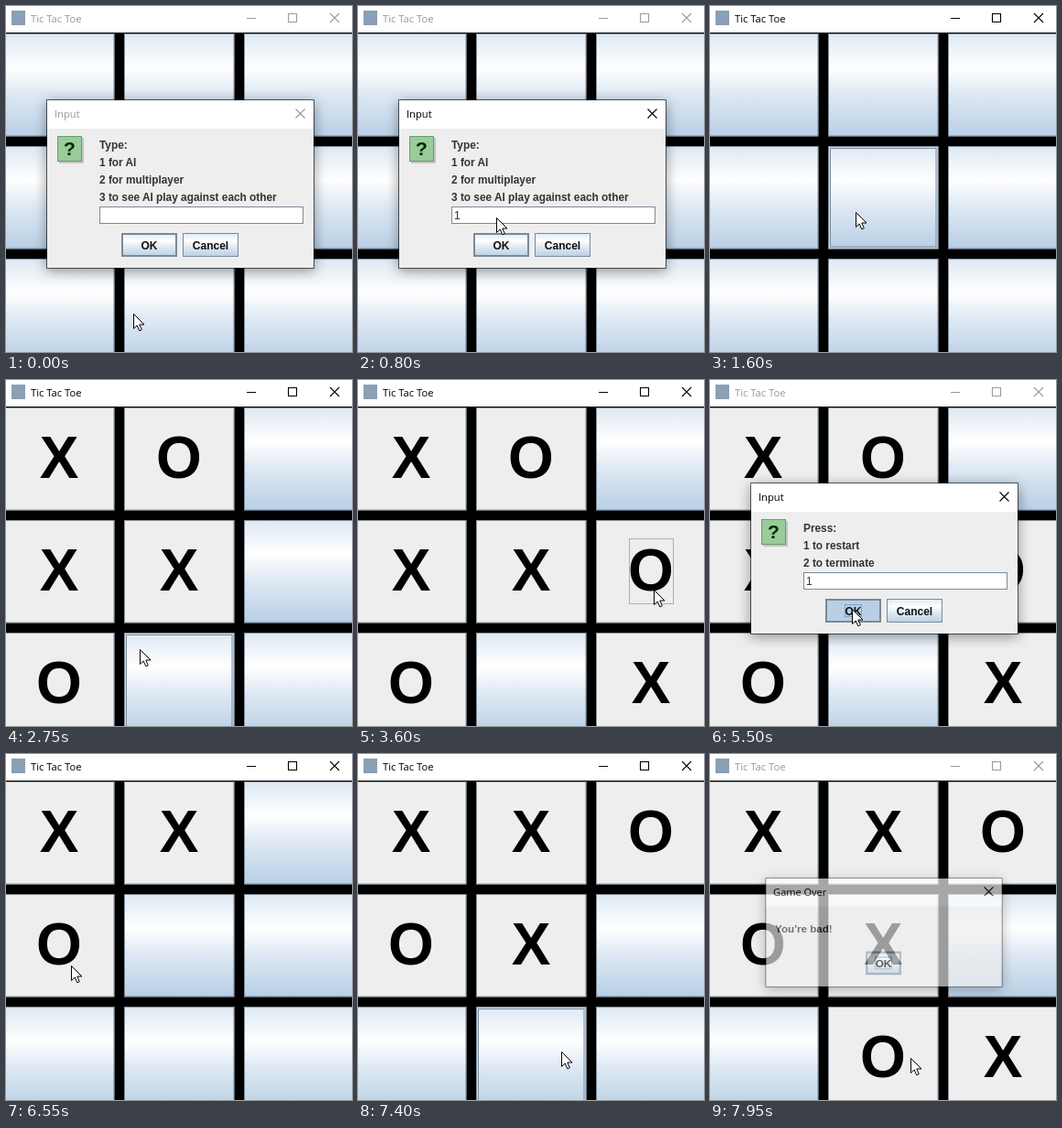
An HTML page that plays this animation: 378x378 px, repeating every 8000 ms.

```html
<!DOCTYPE html>
<html lang="en">
<head>
<meta charset="utf-8">
<title>Tic Tac Toe</title>
<style>
  html, body { margin: 0; width: 100%; height: 100%; overflow: hidden; background: #000; }
  svg { display: block; width: 100vw; height: 100vh; }
  text { white-space: pre; }
  .caption { font: 11.2px "Open Sans", "Noto Sans", sans-serif; }
  .label { font: bold 11.85px "Liberation Sans", Arial, sans-serif; fill: #333; }
  .typed { font: 12px "Liberation Sans", Arial, sans-serif; fill: #333; }
  .mark { font: bold 64px "Liberation Sans", Arial, sans-serif; text-anchor: middle; }
  .button { font-size: 12px; text-anchor: middle; fill: #111; }
  .line { fill: none; stroke: currentColor; stroke-width: 1.1; }
  .caption-fill { fill: currentColor; }
  .dialog { filter: drop-shadow(0 3px 7px rgba(0, 0, 0, .4)); }
</style>
</head>
<body>
<svg id="stage" viewBox="0 0 378 378" xmlns="http://www.w3.org/2000/svg"></svg>
<script>
const LOOP = 8000;
const ACTIVE = '#000', INACTIVE = '#999';
const PRESSED = '#b8cfe5', STEEL = '#7a8a99';

// Mark placements: [time, cell, mark]
const GAMES = [
  { from: 0, to: 5600, moves: [
    [1680, 0, 'X'], [2020, 1, 'O'], [2100, 3, 'X'], [2420, 6, 'O'],
    [2500, 4, 'X'], [3150, 5, 'O'], [3250, 8, 'X']] },
  { from: 5600, to: LOOP, moves: [
    [5800, 0, 'X'], [6250, 3, 'O'], [6350, 1, 'X'], [6930, 2, 'O'],
    [7030, 4, 'X'], [7500, 7, 'O'], [7600, 8, 'X']] }
];

// Pointer stops: [time, x, y]
const PATH = [
  [0, 139, 336], [80, 139, 336], [420, 150, 229], [750, 150, 229], [1000, 157, 252],
  [1250, 157, 252], [1550, 159, 225], [1700, 159, 225], [1980, 186, 92], [2080, 186, 92],
  [2380, 68, 322], [2560, 68, 322], [3080, 323, 229], [3750, 323, 229], [4220, 186, 226],
  [4700, 186, 226], [5300, 155, 250], [5600, 155, 250], [6150, 71, 231], [6600, 71, 231],
  [6880, 318, 96], [7050, 318, 96], [7440, 219, 332], [LOOP, 219, 332]
];

const MAIN_ACTIVE = [[1220, 3680], [5580, 7820]];
const FOCUS = { cell: 5, from: 3150, to: 3680 };

const DIALOGS = [
  { id: 'mode', x: 45, y: 103, w: 291, h: 183, title: 'Input',
    lines: ['Type:', '1 for AI', '2 for multiplayer', '3 to see AI play against each other'],
    shows: [[-500, 1180]], activeFrom: 450, typedAt: 780, press: [1080, 1180] },
  { id: 'over', x: 59, y: 135, w: 262, h: 120, title: 'Game Over',
    shows: [[3680, 4580], [7820, 9000]], activeFrom: 0, press: [4450, 4580] },
  { id: 'again', x: 45, y: 113, w: 291, h: 164, title: 'Input',
    lines: ['Press:', '1 to restart', '2 to terminate'],
    shows: [[4720, 5560]], activeFrom: 0, typedAt: 5020, press: [5440, 5560] }
];

const rect = (x, y, w, h, attrs = '') =>
  `<rect x="${x}" y="${y}" width="${w}" height="${h}" ${attrs}/>`;
const frame = (x, y, w, h, color) =>
  rect(x + .5, y + .5, w - 1, h - 1, `fill="none" stroke="${color}"`);
const text = (x, y, cls, value, attrs = '') =>
  `<text x="${x}" y="${y}" class="${cls}" ${attrs}>${value}</text>`;
const cross = (x, y) =>
  `<path class="line" d="M${x - 5} ${y - 5}l10 10m0-10l-10 10"/>`;

function cellMarkup(i) {
  const x = -2 + 131 * (i % 3), y = 30 + 123 * Math.floor(i / 3), w = 120.5, h = 112.5;
  return rect(x, y, w, h, `id="cell${i}" fill="url(#ocean)"`) +
    frame(x, y, w, h, 'rgba(80,96,108,.65)') +
    `<g id="hover${i}">${frame(x, y, w, h, STEEL)}${frame(x + 1, y + 1, w - 2, h - 2, '#d5e2ee')}` +
    `${frame(x + 2, y + 2, w - 4, h - 4, STEEL)}</g>` +
    text(x + 60, y + 77, 'mark', '', `id="mark${i}"`);
}

function buttonMarkup(x, y, w, label, id) {
  const h = 26, main = !!id;
  return rect(x, y, w, h, `fill="url(#ocean)" ${main ? `id="${id}"` : ''}`) +
    frame(x, y, w, h, STEEL) + (main ? frame(x + 1, y + 1, w - 2, h - 2, STEEL) : '') +
    (main ? `<g id="${id}Focus">${frame(x + w / 2 - 9.5, y + 6, 19, 14, '#7d9fc2')}</g>` : '') +
    text(x + w / 2, y + 17.7, 'label button', label);
}

function questionIcon(x, y) {
  return rect(x + 2, y + 2, 27, 28, 'fill="#aaa" opacity=".6"') +
    rect(x, y, 27, 28, 'fill="#99cc99"') + frame(x, y, 27, 28, '#6c9a6c') +
    text(x + 13.5, y + 21, 'label', '?', 'style="font-size:21px;fill:#002800;text-anchor:middle"');
}

function dialogMarkup({ id, x, y, w, h, title, lines }) {
  let body;
  if (lines) {
    const fieldY = y + 40 + 19 * lines.length;
    body = questionIcon(x + 11, y + 39) +
      lines.map((line, i) => text(x + 57, y + 53 + 19 * i, 'label', line)).join('') +
      rect(x + 57, fieldY, 223, 19, 'fill="#fff"') + frame(x + 57, fieldY, 223, 19, STEEL) +
      text(x + 60, fieldY + 14, 'typed', '1', `id="${id}Typed"`) +
      buttonMarkup(x + 81, fieldY + 29, 61, 'OK', id + 'Ok') +
      buttonMarkup(x + 148, fieldY + 29, 61, 'Cancel');
  } else {
    body = text(x + 10, y + 60.5, 'label', 'You\'re bad!') +
      buttonMarkup(x + 111, y + 81, 39, 'OK', id + 'Ok');
  }
  return `<g id="${id}" class="dialog">` + rect(x, y, w, h, 'fill="#eee"') +
    rect(x, y, w, 31, 'fill="#fff"') + frame(x - 1, y - 1, w + 2, h + 2, 'rgba(0,0,0,.6)') +
    `<g id="${id}Title">${text(x + 8, y + 18.8, 'caption caption-fill', title)}` +
    `${cross(x + w - 14.5, y + 14.5)}</g>${body}</g>`;
}

document.getElementById('stage').innerHTML = `
  <defs><linearGradient id="ocean" x2="0" y2="1">
    <stop stop-color="#dde8f3"/><stop offset=".33" stop-color="#fff"/>
    <stop offset=".6" stop-color="#dde8f3"/><stop offset="1" stop-color="#b8cfe5"/>
  </linearGradient></defs>
  ${rect(0, 0, 378, 378)}
  ${[...Array(9).keys()].map(cellMarkup).join('')}
  <g id="focus">${frame(296, 173, 49, 72, '#b0b0b0')}</g>
  ${rect(0, 0, 378, 29, 'fill="#fff"')}
  ${rect(6, 5, 15, 16, 'fill="#8aa0b4"')}
  <g id="mainTitle">
    ${text(27, 17.5, 'caption caption-fill', 'Tic Tac Toe')}
    <path class="line" d="M263 13.5h10M308.5 8.5h9v9h-9z"/>${cross(359, 13)}
  </g>
  ${DIALOGS.map(dialogMarkup).join('')}
  <path id="pointer" d="M.5 .5V16.5L4.2 13L6.8 18.8L9.3 17.7L6.8 12H12z"
    fill="#fff" stroke="#000" stroke-width="1"/>`;

const el = id => document.getElementById(id);
const show = (id, on) => { el(id).style.display = on ? '' : 'none'; };
const within = (t, [from, to]) => t >= from && t < to;
const clamp = v => Math.max(0, Math.min(1, v));

function pointerAt(t) {
  const i = PATH.findIndex(stop => stop[0] > t);
  const [t0, x0, y0] = PATH[i - 1], [t1, x1, y1] = PATH[i];
  const p = (t - t0) / (t1 - t0), ease = p * p * (3 - 2 * p);
  return [x0 + (x1 - x0) * ease, y0 + (y1 - y0) * ease];
}

function drawDialog(d, t) {
  const opacity = Math.max(...d.shows.map(([from, to]) =>
    t < from ? 0 : Math.min(clamp((t - from) / 200), clamp(1 - (t - to) / 130))));
  show(d.id, opacity > 0);
  if (!opacity) return;
  const scale = .95 + .05 * opacity, cx = d.x + d.w / 2, cy = d.y + d.h / 2;
  el(d.id).setAttribute('opacity', opacity);
  el(d.id).setAttribute('transform',
    `translate(${cx} ${cy}) scale(${scale}) translate(${-cx} ${-cy})`);
  el(d.id + 'Title').style.color = t >= d.activeFrom ? ACTIVE : INACTIVE;
  const pressed = within(t, d.press);
  el(d.id + 'Ok').setAttribute('fill', pressed ? PRESSED : 'url(#ocean)');
  show(d.id + 'OkFocus', pressed || !d.lines);
  if (d.lines) show(d.id + 'Typed', t >= d.typedAt);
}

function draw(t) {
  const [px, py] = pointerAt(t);
  el('pointer').setAttribute('transform', `translate(${Math.round(px)} ${Math.round(py)})`);

  const active = MAIN_ACTIVE.some(span => within(t, span));
  el('mainTitle').style.color = active ? ACTIVE : INACTIVE;

  const board = Array(9).fill('');
  const game = GAMES.find(g => within(t, [g.from, g.to]));
  for (const [at, cell, mark] of game.moves) if (t >= at) board[cell] = mark;

  const col = Math.floor((px + 2) / 131), row = Math.floor((py - 30) / 123);
  const hovered = active && py > 30 ? row * 3 + col : -1;
  board.forEach((mark, i) => {
    el('cell' + i).setAttribute('fill', mark ? '#eee' : 'url(#ocean)');
    el('mark' + i).textContent = mark;
    show('hover' + i, i === hovered && !mark);
  });
  show('focus', board[FOCUS.cell] && within(t, [FOCUS.from, FOCUS.to]));
  DIALOGS.forEach(d => drawDialog(d, t));
}

const start = performance.now();
function tick() {
  draw((performance.now() - start) % LOOP);
  requestAnimationFrame(tick);
}
tick();
</script>
</body>
</html>
```
